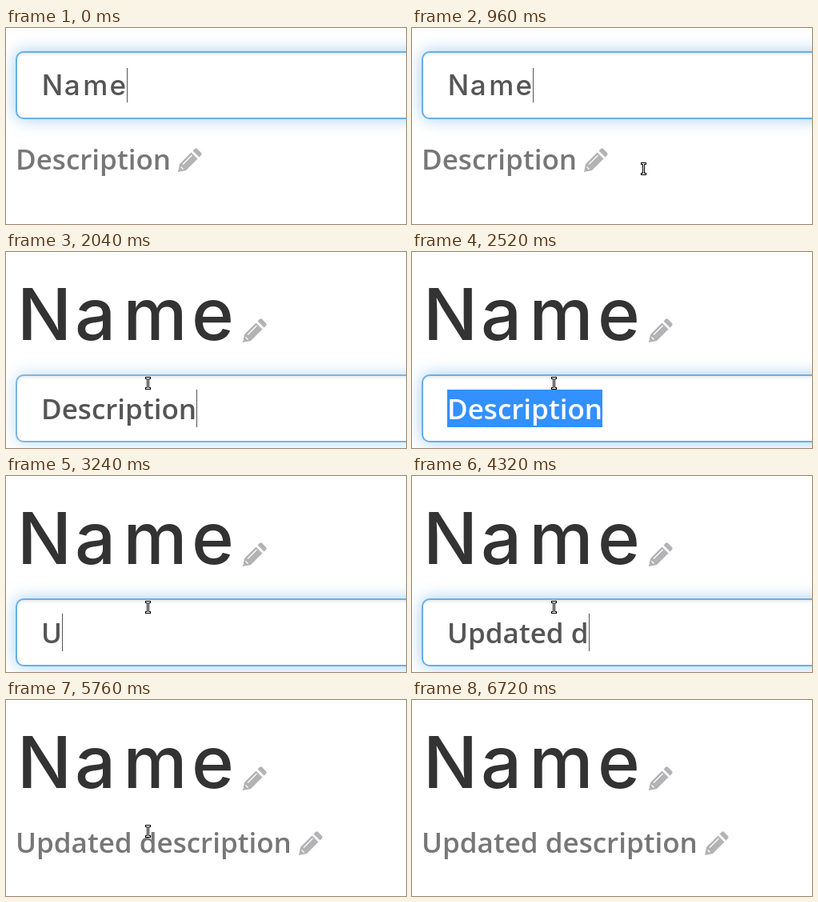
Write an HTML page that moves like this. It is 500 px wide and 245 px high and loops after 8.88 s.

```html
<!DOCTYPE html>
<html lang="en">
<head>
<meta charset="utf-8">
<title>Inline editing</title>
<style>
html, body { margin: 0; width: 100%; height: 100%; overflow: hidden; background: #fff; }
#stage { position: relative; width: 500px; height: 245px; overflow: hidden; background: #fff; }
#stage > * { position: absolute; }
.field {
  left: 12px; width: 600px; height: 85px; box-sizing: border-box;
  border: 2px solid #66afe9; border-radius: 10px; background: #fff;
  box-shadow: inset 0 2.5px 2.5px rgba(0,0,0,.075), 0 0 20px rgba(102,175,233,.6);
}
.field.fading {
  border-color: #7bb5e2;
  box-shadow: inset 0 2.5px 2.5px rgba(0,0,0,.075), 0 0 20px rgba(102,175,233,.42);
}
.name {
  left: 0; top: 0; text-anchor: middle;
  font-family: Inter, "Open Sans", sans-serif; font-weight: 500; font-optical-sizing: none;
}
.desc {
  display: flex; white-space: pre; color: #777;
  font: 600 35px/47px "Open Sans", "Noto Sans", sans-serif;
}
.desc.editing { color: #555; }
.desc.selected span { color: #fff; background: #3390ff; }
.desc .pencil { margin: 10px 0 0 9px; }
.caret { width: 1px; background: #555; }
.pencil { width: 30px; height: 30px; overflow: visible; fill: #b3b3b6; }
[hidden] { display: none !important; }
</style>
</head>
<body>
<div id="stage">
  <div class="field" id="field"></div>
  <svg class="name" width="500" height="245">
    <g id="name"><text font-size="90" x="36 99.5 174.5 246.5">Name</text></g>
  </svg>
  <div class="caret" id="nameCaret" style="left:151px;top:50px;height:43px"></div>
  <svg class="pencil" id="namePencil" viewBox="0 0 30 30" style="left:296px;top:83px">
    <g id="pencilShape">
      <path d="M0 30L2 20L16.5 5.5L24.5 13.5L10 28Z"/>
      <path d="M18.5 3.5L21 1Q22.5 -.3 24 1L29 6Q30.3 7.5 29 9L26.5 11.5Z"/>
      <path d="M6 20.5L17.5 9M3.5 23.5L6.5 26.5" fill="none" stroke="#fff" stroke-width="1.2"/>
    </g>
  </svg>
  <div class="desc" id="desc"><span id="descText"></span><div class="caret" id="descCaret"></div><svg class="pencil" id="descPencil" viewBox="0 0 30 30"><use href="#pencilShape"/></svg></div>
  <svg id="pointer" width="7" height="16" style="left:0;top:0" fill="none" stroke-linecap="square">
    <path id="beam" d="M1.5 1.5H5.5M1.5 14.5H5.5M3.5 1.5V14.5" stroke="#000" stroke-width="3"/>
    <path d="M1.5 1.5H5.5M1.5 14.5H5.5M3.5 1.5V14.5" stroke="#fff" stroke-width="1"/>
  </svg>
</div>
<script>
const LOOP = 8880, TICK = 120;
const OLD = "Description", NEW = "Updated description";
const REST = [178, 164], ENTRY = [490, 198], EXIT = [241, 205];

// [time, letters typed so far]
const KEYS = [
  [3240, 1], [3360, 2], [3480, 3], [3600, 4], [3720, 5], [3840, 6],
  [4080, 7], [4320, 9],
  [4560, 10], [4680, 11], [4800, 12], [4920, 14], [5040, 15],
  [5280, 16], [5400, 18], [5520, 19]
];

const el = id => document.getElementById(id);
const show = (id, on) => { el(id).hidden = !on; };
// The hidden property does not reflect on SVG elements.
const showSvg = (id, on) => { el(id).style.display = on ? "" : "none"; };

function typed(t) {
  let count = 0;
  for (const [time, n] of KEYS) if (t >= time) count = n;
  return count;
}

function pointerAt(t) {
  if (t < 720 || t >= 6720) return null;
  if (t >= 6600) return EXIT;
  const left = (1 - Math.min(1, (t - 720) / 600)) ** 2;
  return REST.map((v, i) => Math.round(v + (ENTRY[i] - v) * left));
}

function draw(t) {
  const editName = t < 2040, done = t >= 5760, editDesc = !editName && !done;
  const count = typed(t);
  const selected = t >= 2520 && count === 0;

  show("field", !done);
  el("field").style.top = editName ? "29px" : "153px";
  el("field").classList.toggle("fading", t >= 1920 && t < 2160);

  el("name").setAttribute("transform",
    editName ? "translate(44 84) scale(.389)" : "translate(12 110)");
  el("name").setAttribute("fill", editName ? "#555" : "#333");
  show("nameCaret", t < 1920);
  showSvg("namePencil", !editName);

  const desc = el("desc");
  desc.style.left = editDesc ? "44px" : "12px";
  desc.style.top = editName ? "140px" : editDesc ? "172px" : "154px";
  desc.classList.toggle("editing", editDesc);
  desc.classList.toggle("selected", editDesc && selected);
  el("descText").textContent = count ? NEW.slice(0, count) : OLD;
  show("descCaret", editDesc && !selected);
  showSvg("descPencil", !editDesc);

  const spot = pointerAt(t);
  showSvg("pointer", spot);
  if (spot) el("pointer").style.transform = `translate(${spot[0] - 4}px, ${spot[1] - 8}px)`;
}

let last = -1;
function frame(now) {
  const t = Math.floor(now % LOOP / TICK) * TICK;
  if (t !== last) draw(last = t);
  requestAnimationFrame(frame);
}
draw(0);
requestAnimationFrame(frame);
</script>
</body>
</html>
```
